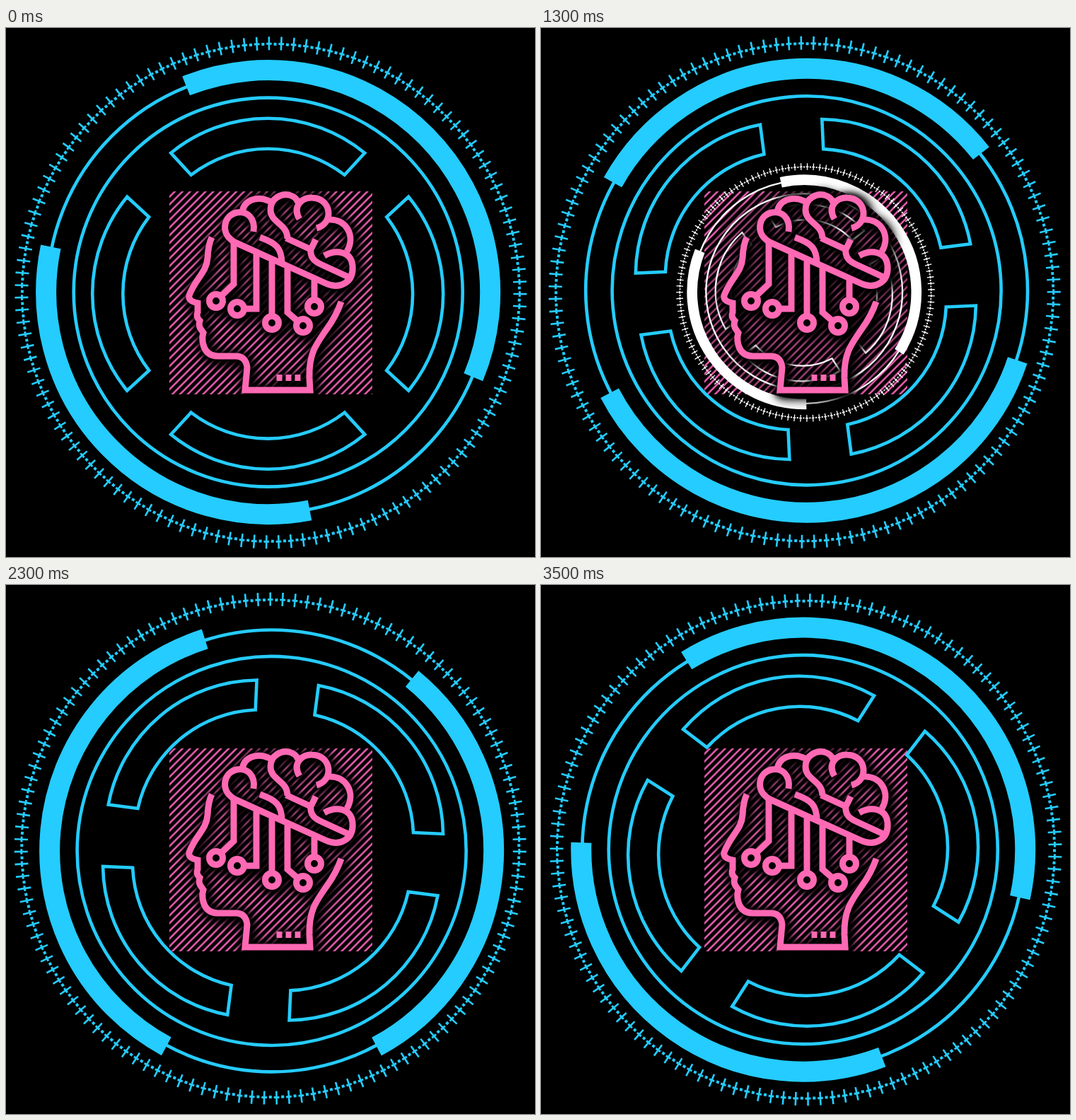
An HTML page that plays this animation: 748 px wide and 748 px high, repeating every 3600 ms.

```html
<!DOCTYPE html>
<html>
<head>
<meta charset="utf-8">
<style>
html, body { margin: 0; width: 100%; height: 100%; overflow: hidden; background: #000; }
svg { position: absolute; left: 0; top: 0; width: 748px; height: 748px; fill: none; }
#icon { filter: drop-shadow(1px 1px 4px #000) drop-shadow(2px 2px 6px #000) drop-shadow(2px 2px 6px #000); }
#icon g { stroke: #ff69b4; stroke-width: 9; }
</style>
</head>
<body>
<svg viewBox="0 0 748 748">
  <defs>
    <pattern id="hatch" width="7.7" height="7.7" patternUnits="userSpaceOnUse" patternTransform="translate(231 231) rotate(45)">
      <path d="M5.6 0V7.7" stroke="#f060b4" stroke-width="2.5"/>
    </pattern>
    <g id="dial" stroke="currentColor" stroke-width="4.6">
      <g id="rings" transform="translate(-3 0)">
        <circle r="312.4"/>
        <circle r="275"/>
      </g>
      <g id="boxes" transform="translate(-3.5 2.1)"></g>
      <g transform="translate(.7 .7) rotate(-90.4)">
        <circle r="352.5" pathLength="127" stroke-width="19" stroke-dasharray=".15 .85" stroke-dashoffset=".075"/>
        <circle r="352" pathLength="127" stroke-width="3" stroke-dasharray=".44 .56" stroke-dashoffset=".22"/>
        <circle r="351.5" pathLength="127" stroke-width="4" stroke-dasharray=".23 .77" stroke-dashoffset="-.385"/>
      </g>
    </g>
  </defs>
  <rect x="231" y="231" width="287" height="287" fill="url(#hatch)"/>
  <use id="outer" href="#dial" color="#25ccff"/>
  <g id="inner">
    <circle cx="374" cy="374" r="152" fill="#000" opacity=".3"/>
    <use id="small" href="#dial" color="#fff"/>
  </g>
</svg>
<svg id="icon" viewBox="0 0 748 748">
  <g>
    <!-- head -->
    <path d="M291 296Q286 306 285 325C284 345 268 354 259 378Q257 386 271 389V402Q268 408 274 414Q272 421 275 425L279 431Q277 437 278 443Q281 464 300 464H325Q339 464 341 480L338 512H430L429 495C428 462 437 449 454 425Q467 407 474 387"/>
    <!-- brain -->
    <path d="M350 288C353 268 340 258 326 261C308 265 304 288 318 299Q321 302 328 305L452 361C472 370 492 360 490 336C488 315 466 313 450 322"/>
    <path d="M334 262C335 244 354 236 373 245M398 298C398 276 374 276 374 257C374 240 390 234 400 236Q411 239 413 247"/>
    <path d="M415 270C404 252 419 239 433 240C461 241 464 277 439 283M455 271C481 269 495 294 482 316"/>
    <path d="M396 297L431 313L438 299M431 311C429 326 438 331 447 335L484 352M359 296C382 304 390 311 390 333"/>
    <!-- circuit leads -->
    <path d="M322 304V362L303 380M354 320V397H336M376 330V408M398 340V402L413 415M436 357V385"/>
    <g id="nodes" stroke-width="8"></g>
    <path d="M382.500 494.500h8m5 0h8m5 0h8"/>
  </g>
</svg>
<script>
const el = id => document.getElementById(id);
const polar = (r, deg) => {
  const a = deg * Math.PI / 180;
  return `${r * Math.cos(a)} ${r * Math.sin(a)}`;
};
const band = (from, to) =>
  `<path stroke-width="29" d="M${polar(314, from)}A314 314 0 0 1 ${polar(314, to)}"/>`;

el('rings').innerHTML += band(-111.7, 22.5) + band(79.2, 191.8);
el('boxes').innerHTML = [0, 90, 180, 270].map(a =>
  `<path transform="rotate(${a})" d="M-137 -199A216 216 0 0 1 137 -199L108.500 -168A178 178 0 0 0 -108.500 -168Z"/>`).join('');
el('nodes').innerHTML = [[297, 386], [327, 397], [376, 417], [420, 421], [436, 394]]
  .map(([x, y]) => `<circle cx="${x}" cy="${y}" r="9.5"/>`).join('');

const place = (id, angle, scale) =>
  el(id).setAttribute('transform', `translate(373.7 373.6) rotate(${angle}) scale(${scale})`);

function draw() {
  const k = Math.floor(performance.now() % 3600 / 100);
  place('outer', 10 * k, 1);
  // the small dial turns back and pauses one step while it is dark
  place('small', (k < 24 ? 139.7 : 149.7) - 10 * k, .505);
  const dark = k < 3 || k > 33 || (k > 21 && k < 25);
  el('inner').setAttribute('visibility', dark ? 'hidden' : 'visible');
  requestAnimationFrame(draw);
}
draw();
</script>
</body>
</html>
```
